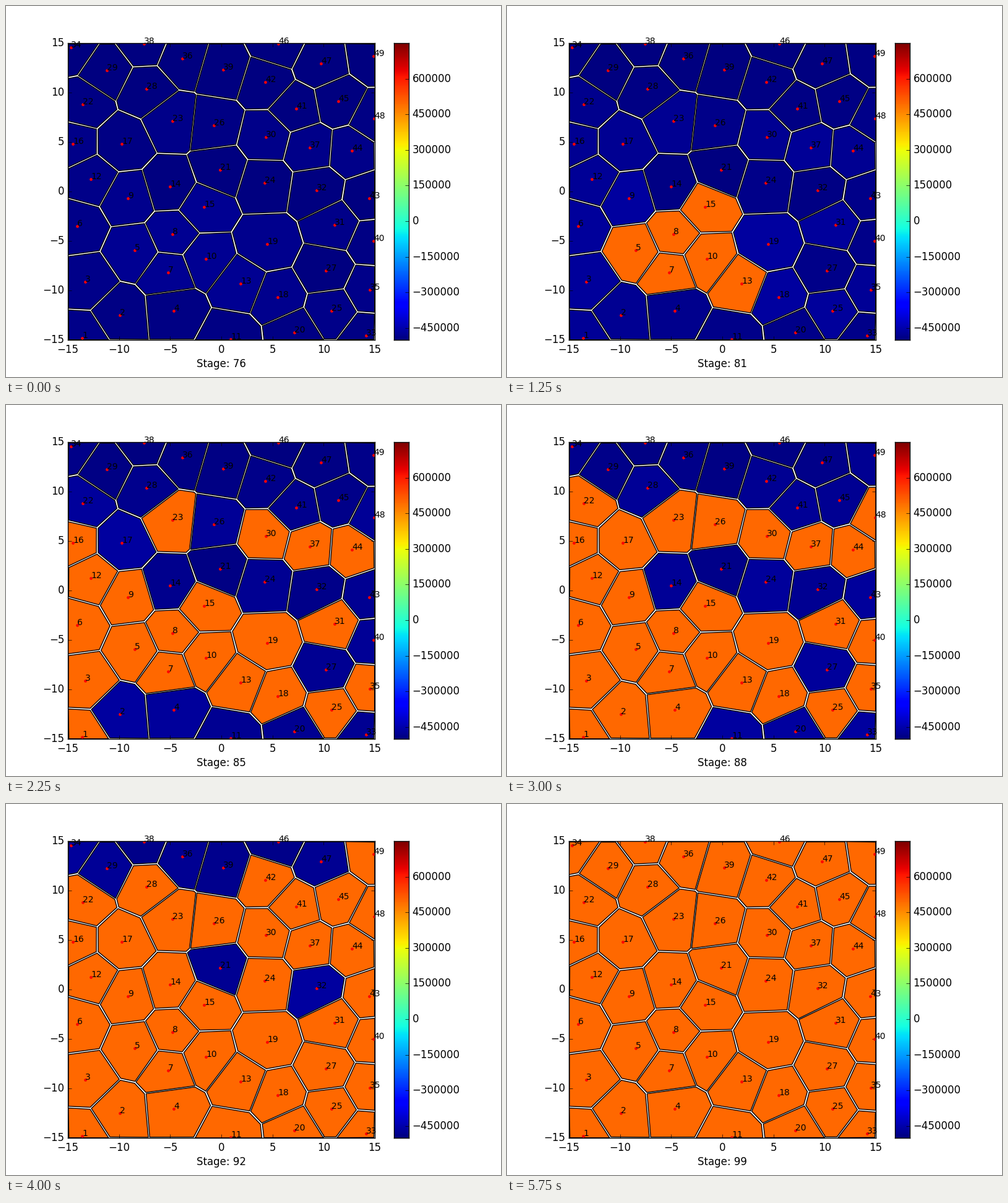
A matplotlib script for the animation above (6 s loop, 800x600 px).

```python
import numpy as np
import matplotlib.pyplot as plt
from matplotlib.animation import FuncAnimation
from matplotlib.collections import PolyCollection

plt.rcParams.update({
    "font.family": "DejaVu Sans", "font.size": 12, "axes.linewidth": 1.0,
    "text.kerning_factor": 6,
    "xtick.direction": "in", "ytick.direction": "in",
    "xtick.major.size": 4, "ytick.major.size": 4,
    "xtick.major.width": 0.5, "ytick.major.width": 0.5,
    "xtick.major.pad": 5, "ytick.major.pad": 4,
    "ytick.alignment": "center",
})

W, H, DPI = 800, 600, 100
LEFT, RIGHT, TOP, BOTTOM = 100, 596, 60, 540
LIMIT = 15
FIRST, FRAMES, STEP = 76, 24, 250
VMIN, VMAX = -500000, 750000
FIRED = (500000 - VMIN) / (VMAX - VMIN)
SHRINK = 0.1
JET = plt.get_cmap("jet")

# Cell seeds in stage pixels, in the order in which they fire
SEEDS = np.array([
    (323, 409), (269, 369), (262, 431), (208, 395), (379, 449), (320, 325),
    (197, 311), (439, 471), (422, 385), (128, 446), (115, 356), (526, 493),
    (531, 354), (137, 280), (123, 537), (588, 459), (491, 229), (108, 223),
    (269, 186), (420, 212), (559, 234), (184, 500), (187, 223), (271, 493),
    (124, 159), (336, 193), (594, 380), (595, 182), (363, 539), (466, 528),
    (582, 533), (418, 286), (517, 428), (587, 311), (265, 292), (227, 134),
    (469, 166), (419, 123), (537, 154), (594, 81), (502, 298), (105, 67),
    (163, 104), (346, 265), (285, 85), (509, 93), (351, 103), (223, 61),
    (440, 61)], float)


def to_data(p):
    x = (p[:, 0] - LEFT) / (RIGHT - LEFT)
    y = (BOTTOM - p[:, 1]) / (BOTTOM - TOP)
    return (2 * np.column_stack([x, y]) - 1) * LIMIT


def clip(poly, mid, normal):
    """Keep the part of poly on the inner side of a line."""
    out = []
    side = [np.dot(p - mid, normal) for p in poly]
    for i, p in enumerate(poly):
        j = (i + 1) % len(poly)
        if side[i] <= 0:
            out.append(p)
        if side[i] * side[j] < 0:
            out.append(p + (poly[j] - p) * side[i] / (side[i] - side[j]))
    return out


def voronoi_cell(k):
    """Voronoi cell of one point, each corner pulled slightly inwards."""
    seed = points[k]
    poly = list(LIMIT * np.array([(-1., -1), (1, -1), (1, 1), (-1, 1)]))
    for j, other in enumerate(points):
        if j != k:
            poly = clip(poly, (seed + other) / 2, other - seed)
    pull = seed - np.array(poly)
    dist = np.maximum(np.linalg.norm(pull, axis=1), 1e-6)[:, None]
    return poly + pull / dist * np.minimum(SHRINK, dist)


def axes_at(x0, x1):
    return fig.add_axes([x0 / W, 1 - BOTTOM / H, (x1 - x0) / W,
                         (BOTTOM - TOP) / H])


def minus(values):
    return [str(v).replace("-", "\u2212") for v in values]


points = to_data(SEEDS)
count = len(points)
# Cells are numbered by their distance from the lower left corner
number = np.linalg.norm(points + LIMIT, axis=1).argsort().argsort() + 1
# Firing stage from the growing total of fired cells
start = np.ceil(np.interp(np.arange(1, count + 1), [0, 9, 21, 28, 40, count],
                          [79, 82, 85, 88, 92, 99]) - 1e-9)

fig = plt.figure(figsize=(W / DPI, H / DPI), dpi=DPI, facecolor="white")
ax = axes_at(LEFT, RIGHT)
ax.set(xlim=(-LIMIT, LIMIT), ylim=(-LIMIT, LIMIT))
ticks = range(-LIMIT, LIMIT + 1, 5)
ax.set_xticks(ticks, minus(ticks))
ax.set_yticks(ticks, minus(ticks))
ax.tick_params(top=True, right=True)

cells = PolyCollection([voronoi_cell(k) for k in range(count)],
                       edgecolors="black", linewidths=1.0, zorder=1)
ax.add_collection(cells)
ax.plot(points[:, 0], points[:, 1], "o", color="red", markersize=3.4,
        markeredgewidth=0, zorder=2)
for n, (x, y) in zip(number, points):
    ax.text(x, y, str(n), fontsize=10, zorder=3)

bar = axes_at(627, 651)
bar.imshow(np.linspace(0, 1, 256)[:, None], cmap=JET, origin="lower",
           aspect="auto", extent=(0, 1, VMIN, VMAX), interpolation="nearest")
levels = range(-450000, 600001, 150000)
bar.set_xticks([])
bar.set_yticks(levels, minus(levels))
bar.yaxis.tick_right()

caption = fig.text(348 / W, 16 / H, "", ha="center", va="baseline")


def draw(i):
    stage = FIRST + i
    wait = start - stage
    # Cells warm up slowly, then jump to the fired level
    warm = 0.03 * 0.85 ** np.maximum(wait - 1, 0)
    cells.set_facecolor(JET(np.where(wait <= 0, FIRED, warm)))
    caption.set_text(f"Stage: {stage}")
    return cells, caption


anim = FuncAnimation(fig, draw, frames=FRAMES, interval=STEP,
                     init_func=lambda: draw(0), repeat=True, repeat_delay=0)
plt.show()
```
